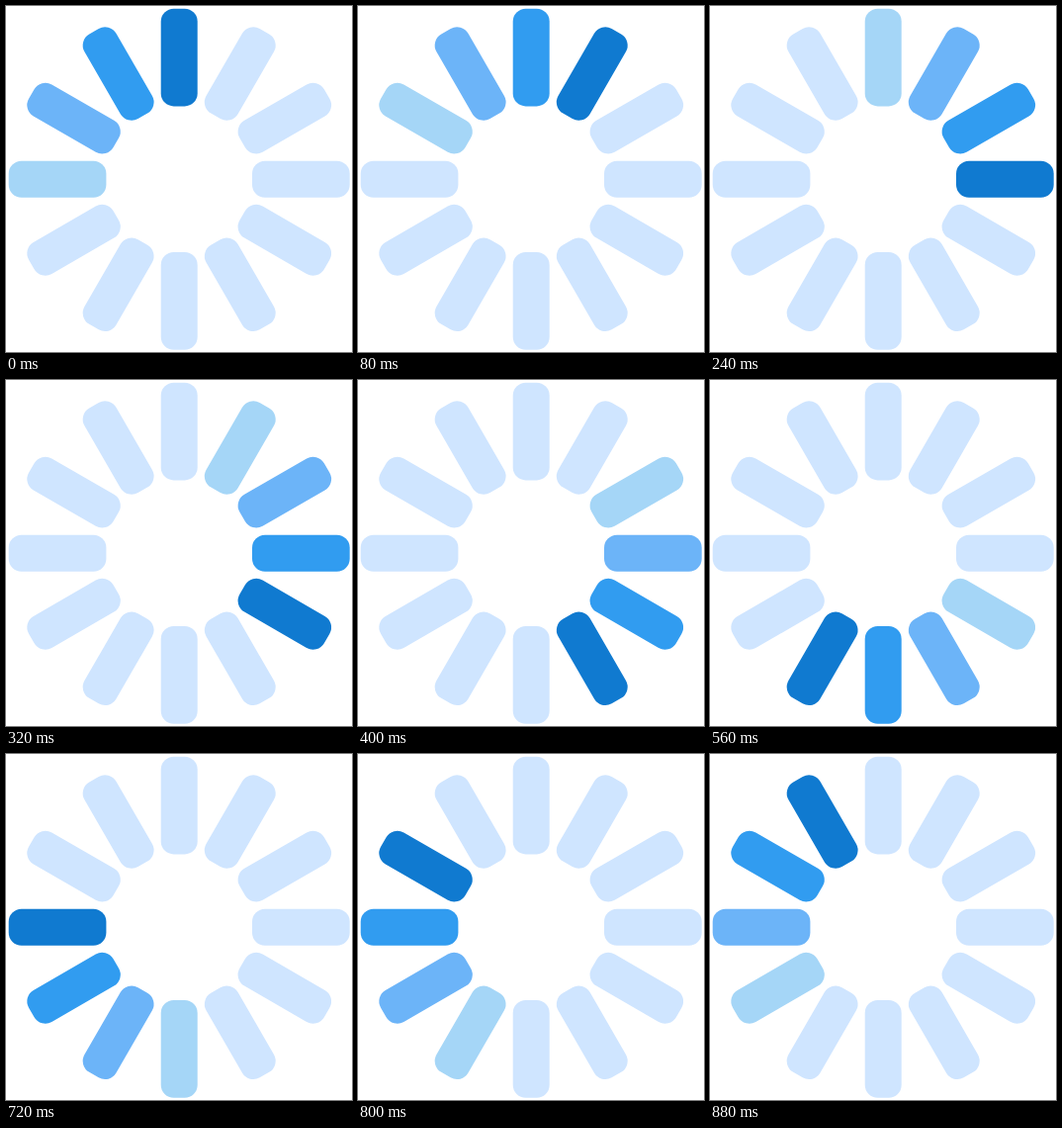
Recreate the animation shown at these times as an HTML page. Size 350 px wide and 350 px high, loop 960 ms.

```html
<!DOCTYPE html>
<html lang="en">
<head>
<meta charset="utf-8">
<title>Spinner</title>
<style>
  html, body { margin: 0; width: 100%; height: 100%; overflow: hidden; background: #fff; }
  svg { display: block; width: 100%; height: 100%; }
</style>
</head>
<body>
<svg id="spinner" viewBox="0 0 350 350"></svg>
<script>
  const COUNT = 12, STEP = 80, CENTER = 175.2;
  const IDLE = '#cfe5ff';
  const TRAIL = ['#107ad0', '#319cf0', '#6cb4f8', '#a5d6f7'];

  const svg = document.getElementById('spinner');
  const bars = Array.from({ length: COUNT }, (_, i) => {
    const bar = document.createElementNS('http://www.w3.org/2000/svg', 'rect');
    const attrs = {
      x: -18.5, y: -172.5, width: 37, height: 98.7, rx: 13,
      transform: `translate(${CENTER} ${CENTER}) rotate(${i * 360 / COUNT})`
    };
    for (const name in attrs) bar.setAttribute(name, attrs[name]);
    return svg.appendChild(bar);
  });

  function draw(time) {
    const head = Math.floor(time / STEP) % COUNT;
    bars.forEach((bar, i) => {
      const age = (head - i + COUNT) % COUNT;
      bar.setAttribute('fill', TRAIL[age] || IDLE);
    });
  }

  const start = performance.now();
  function tick() {
    draw(performance.now() - start);
    requestAnimationFrame(tick);
  }
  tick();
</script>
</body>
</html>
```
